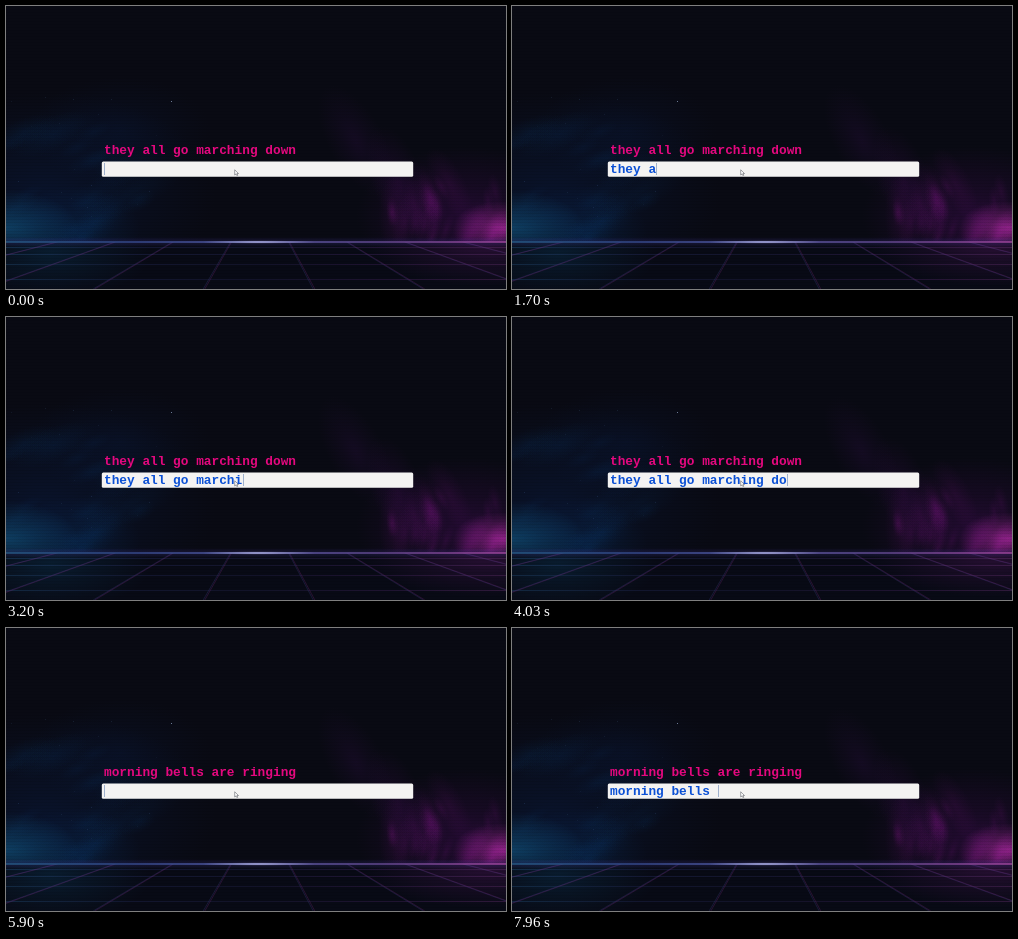
An HTML page with a canvas that plays this animation: 500x283 px, repeating every 8000 ms.

```html
<!DOCTYPE html>
<html lang="en">
<head>
<meta charset="utf-8">
<title>Typing game</title>
<style>
  html, body { margin: 0; width: 100%; height: 100%; overflow: hidden; background: #090a13; }
  canvas { display: block; width: 500px; height: 283px; }
</style>
</head>
<body>
<canvas id="stage" width="500" height="283"></canvas>
<script>
const W = 500, H = 283, HORIZON = 236, LOOP = 8000;
const MONO = 'bold 12.8px "Liberation Mono", monospace';
const SANS = '11.1px "Liberation Sans", Arial, sans-serif';
const ctx = document.getElementById('stage').getContext('2d');

// Each round: when it appears, its text, and [time, letters typed] marks.
const rounds = [
  { from: -280, text: 'they all go marching down', keys: [[1090, 1], [2280, 11], [3160, 18], [4180, 25]] },
  { from: 5690, text: 'morning bells are ringing', keys: [[6240, 1], [7900, 14]] }
];
const RESULT_AT = 4190;
const BLINK = 530;

function seeded(seed) {
  return () => (seed = (seed * 16807) % 2147483647) / 2147483647;
}

function glow(c, x, y, rx, ry, rgb, alpha, angle = 0) {
  c.save();
  c.translate(x, y);
  c.rotate(angle);
  c.scale(rx, ry);
  const g = c.createRadialGradient(0, 0, 0, 0, 0, 1);
  g.addColorStop(0, `rgba(${rgb},${alpha})`);
  g.addColorStop(0.45, `rgba(${rgb},${alpha * 0.5})`);
  g.addColorStop(1, `rgba(${rgb},0)`);
  c.fillStyle = g;
  c.fillRect(-1, -1, 2, 2);
  c.restore();
}

function line(c, x1, y1, x2, y2, color, width) {
  c.strokeStyle = color;
  c.lineWidth = width;
  c.beginPath();
  c.moveTo(x1, y1);
  c.lineTo(x2, y2);
  c.stroke();
}

function across(c, ...colors) {
  const g = c.createLinearGradient(0, 0, W, 0);
  colors.forEach((color, i) => g.addColorStop(i / (colors.length - 1), color));
  return g;
}

function drawSky(c) {
  const rnd = seeded(77);
  c.fillStyle = '#090a13';
  c.fillRect(0, 0, W, H);
  c.globalCompositeOperation = 'lighter';

  glow(c, 40, 190, 170, 105, '0,18,48', 0.5);
  glow(c, 115, 125, 90, 55, '0,14,38', 0.35);
  glow(c, 0, 222, 72, 38, '8,78,108', 0.6);
  glow(c, 70, 225, 65, 45, '0,30,55', 0.45);
  glow(c, 460, 210, 110, 70, '46,2,54', 0.55);
  glow(c, 350, 135, 28, 62, '22,3,30', 0.5, -0.5);
  glow(c, 392, 175, 26, 58, '38,2,46', 0.4, -0.35);
  glow(c, 496, 222, 50, 27, '165,35,135', 0.6);

  for (let i = 0; i < 24; i++) {
    const u = rnd(), v = rnd(), size = 8 + rnd() * 18;
    glow(c, u * 135, 125 + v * 110, size * 1.8, size * 0.7, '0,34,62', 0.13, -0.4);
    glow(c, 500 - u * 115, 232 - v * (70 - u * 30), size * 0.6, size * 1.6, '110,10,105', 0.14, 0.5 - v);
  }

  for (let i = 0; i < 20; i++) {
    c.fillStyle = `rgba(80,120,160,${0.05 + rnd() * 0.13})`;
    c.fillRect(Math.floor(rnd() * 180), Math.floor(90 + rnd() * 130), 1, 1);
  }
  c.fillStyle = 'rgba(150,170,195,.65)';
  c.fillRect(165, 95, 1, 1);
  c.globalCompositeOperation = 'source-over';
}

function drawFloor(c) {
  c.save();
  c.beginPath();
  c.rect(0, HORIZON, W, H - HORIZON);
  c.clip();
  c.fillStyle = '#080a15';
  c.fillRect(0, HORIZON, W, H - HORIZON);
  glow(c, 45, 248, 100, 45, '10,55,85', 0.4);
  glow(c, 480, 240, 120, 40, '75,20,85', 0.45);

  const rows = across(c, '#1c3d60', '#1c2146', '#1b1c3b', '#301c48', '#4d2659');
  [241, 248, 258, 273].forEach(y => line(c, 0, y + 0.5, W, y + 0.5, rows, 0.6));

  for (let k = -6; k <= 6; k++) {
    const top = 254 + (k - 0.5) * 58;
    const bottom = 253 + (k - 0.5) * 110;
    line(c, top - 0.5, HORIZON, bottom - 0.8, H, 'rgba(60,66,130,.45)', 0.7);
    line(c, top + 0.5, HORIZON, bottom + 0.8, H, 'rgba(115,40,115,.45)', 0.7);
  }
  c.restore();

  const haze = c.createLinearGradient(0, HORIZON - 5, 0, HORIZON + 5);
  haze.addColorStop(0, 'rgba(75,60,170,0)');
  haze.addColorStop(0.5, 'rgba(75,60,170,.25)');
  haze.addColorStop(1, 'rgba(75,60,170,0)');
  c.fillStyle = haze;
  c.fillRect(0, HORIZON - 5, W, 10);
  c.fillStyle = across(c, '#235880', '#34498a', '#5a60ac', '#64498f', '#a0459a');
  c.fillRect(0, HORIZON - 0.7, W, 1.4);
  glow(c, 253, HORIZON, 58, 1.7, '205,205,250', 0.8);
}

function makeBackdrop() {
  const layer = document.createElement('canvas');
  layer.width = W;
  layer.height = H;
  const c = layer.getContext('2d');
  drawSky(c);
  drawFloor(c);
  c.fillStyle = 'rgba(0,0,0,.08)';
  for (let y = 0; y < H; y += 3) c.fillRect(0, y, W, 1);
  return layer;
}
const backdrop = makeBackdrop();

function typedCount(keys, t) {
  if (t < keys[0][0]) return 0;
  for (let i = 1; i < keys.length; i++) {
    const [t0, n0] = keys[i - 1], [t1, n1] = keys[i];
    if (t < t1) return n0 + Math.floor((n1 - n0) * (t - t0) / (t1 - t0));
  }
  return keys[keys.length - 1][1];
}

function write(text, x, y, font, color, align = 'left') {
  ctx.font = font;
  ctx.fillStyle = color;
  ctx.textAlign = align;
  ctx.fillText(text, x, y);
}

function drawRound({ from, text, keys }, t) {
  const count = typedCount(keys, t);
  write(text, 98, 148, MONO, '#e5087f');

  ctx.fillStyle = '#f4f3f2';
  ctx.beginPath();
  ctx.roundRect(95.8, 155.4, 311.4, 15.4, 1.5);
  ctx.fill();
  write(text.slice(0, count), 98, 167.4, MONO, '#0b50d5');

  const blinkOn = Math.floor((t - from) / BLINK) % 2 === 0;
  if (count || blinkOn) {
    ctx.fillStyle = '#9fb0cc';
    ctx.fillRect(Math.round(98.4 + count * 7.68), 157, 1, 12);
  }
}

function drawResult() {
  ctx.strokeStyle = '#fff';
  ctx.lineWidth = 0.4;
  [['Accuracy: 100%', 147.4], ['Speed: 96 wpm', 167]].forEach(([text, y]) => {
    write(text, 251.5, y, SANS, '#fff', 'center');
    ctx.strokeText(text, 251.5, y);
  });
}

const pointer = new Path2D('M228.7 163.8v5.2l1.3-1.1 .9 1.7 .9-.4-.9-1.7h1.6z');
function drawPointer() {
  ctx.fillStyle = '#fff';
  ctx.strokeStyle = '#55565e';
  ctx.lineWidth = 0.55;
  ctx.fill(pointer);
  ctx.stroke(pointer);
}

const start = performance.now();
function render() {
  const t = (performance.now() - start) % LOOP;
  ctx.drawImage(backdrop, 0, 0);
  if (t >= rounds[1].from) drawRound(rounds[1], t);
  else if (t >= RESULT_AT) drawResult();
  else drawRound(rounds[0], t);
  drawPointer();
  requestAnimationFrame(render);
}
render();
</script>
</body>
</html>
```
